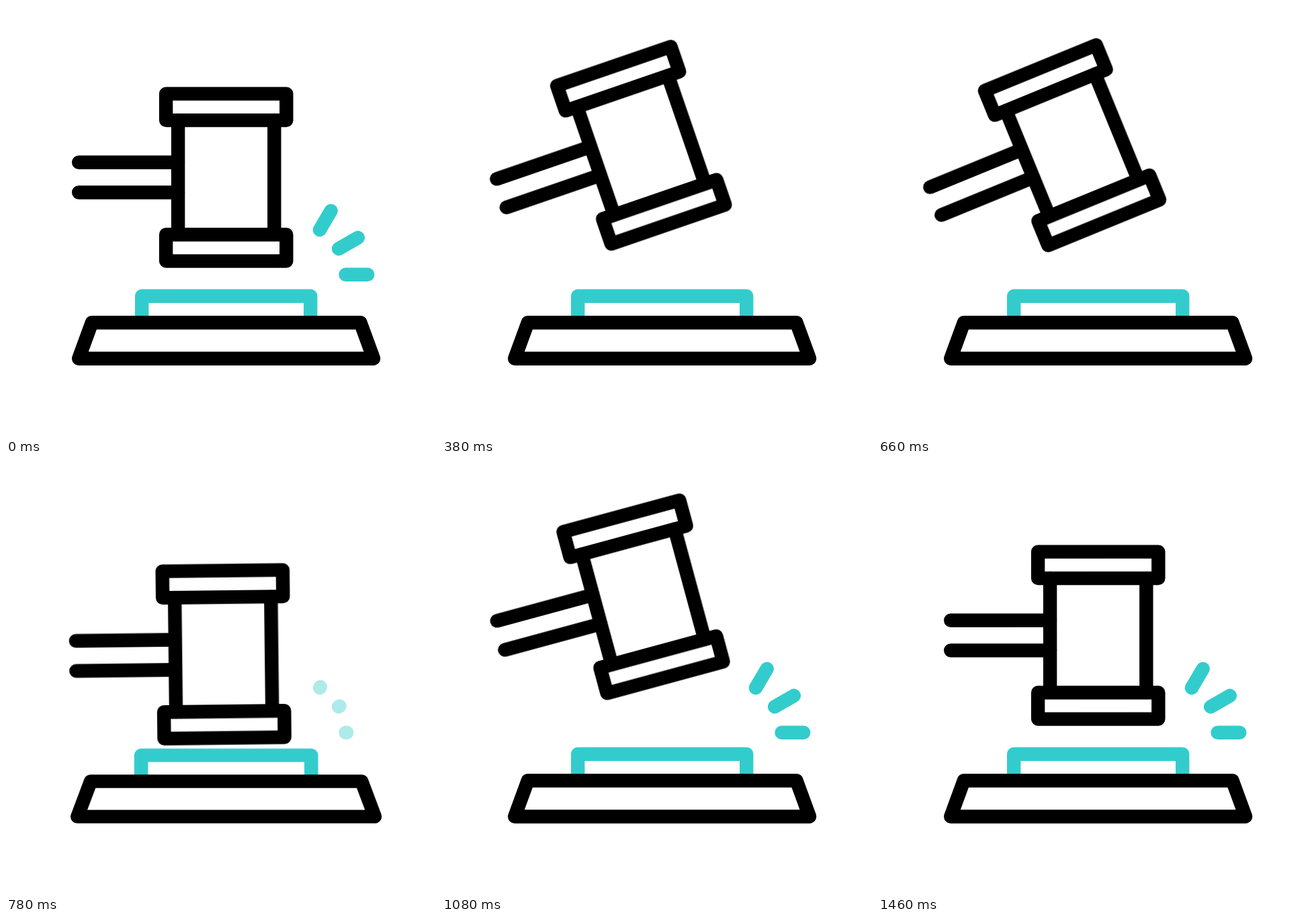
Write an HTML page that moves like this. It is 640 by 640 pixels and loops after 2400 ms.

```html
<!DOCTYPE html>
<html lang="en">
<head>
<meta charset="utf-8">
<title>Gavel</title>
<style>
  html, body { margin: 0; width: 100%; height: 100%; overflow: hidden; background: #fff; }
  svg { display: block; width: 100vw; height: 100vh; }
  path { fill: none; stroke: #000; stroke-width: 20.4; stroke-linejoin: round; stroke-linecap: round; }
  .teal path { stroke: #3cc; }
  .teal .block { stroke: #3cc; stroke-linecap: butt; }

  .rebound, .swing, .stand, .sparks, .sparks path {
    animation: 2400ms cubic-bezier(.3333, 0, .6667, 1) infinite;
  }
  .rebound { transform-origin: 108px 255.2px; animation-name: rebound; }
  .swing { transform-origin: 298px 130px; animation-name: swing; }
  .stand { transform-origin: 327.7px 535px; animation-name: squash; }
  .sparks { animation-name: fade; }
  .sparks path { stroke-dasharray: 1 2; animation-name: draw; }

  /* lift, then strike */
  @keyframes swing {
    0%, 4.1667% { transform: translate(0, 0) rotate(0deg); }
    25% { transform: translate(-119px, -53px) rotate(-32deg); }
    31.9444% { transform: translate(-3.6px, 31.5px) rotate(0deg); }
    37.5%, 100% { transform: translate(0, 0) rotate(0deg); }
  }
  /* bounce off the block and settle */
  @keyframes rebound {
    0%, 31.9444% { transform: translate(0, 0) rotate(0deg); }
    37.5% { transform: translate(-27px, 0) rotate(-20deg); }
    61.1111%, 100% { transform: translate(0, 0) rotate(0deg); }
  }
  @keyframes squash {
    0%, 31.9444% { transform: scale(1, 1); }
    34.7222% { transform: scale(1.072, .85); }
    37.5%, 100% { transform: scale(1, 1); }
  }
  @keyframes fade {
    0%, 6.9444% { opacity: 1; }
    8.3333%, 31.9444% { opacity: 0; }
    33.3333%, 100% { opacity: 1; }
  }
  @keyframes draw {
    0%, 4.1667% { stroke-dashoffset: 0; }
    8.3333% { stroke-dashoffset: -1; animation-timing-function: step-start; }
    8.4%, 31.9444% { stroke-dashoffset: 1; }
    36.1111%, 100% { stroke-dashoffset: 0; }
  }
</style>
</head>
<body>
<svg viewBox="0 0 640 640">
  <g class="stand">
    <g class="teal"><path class="block" d="M202.2 466V431.7H453.2V466"/></g>
    <path d="M127.8 471.2H527.5L547.1 524.7H108.2Z"/>
  </g>
  <g class="sparks teal">
    <path pathLength="1" d="M466.9 333.2L483.6 304.9"/>
    <path pathLength="1" d="M495 361.3L523.8 344.8"/>
    <path pathLength="1" d="M505.5 399.8H538.2"/>
  </g>
  <g class="rebound">
    <g class="swing">
      <path d="M238.1 130.6H417.3V170.1H238.1Z"/>
      <path d="M238.1 340.2H417.3V379.6H238.1Z"/>
      <path d="M256.1 170V340M399.3 170V340"/>
      <path d="M108.2 232.8H256M108.2 277.5H256"/>
    </g>
  </g>
</svg>
</body>
</html>
```
